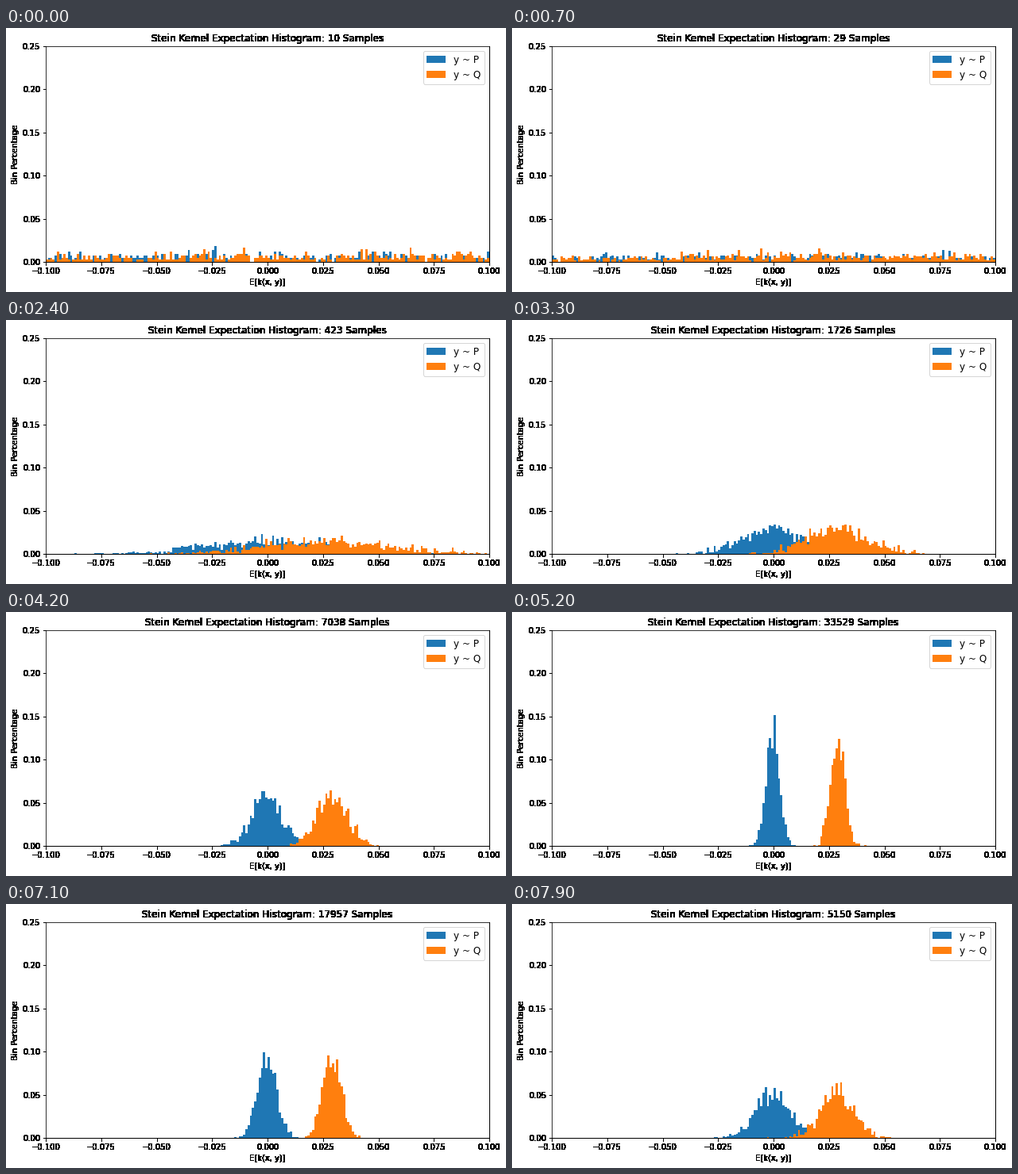
These frames come from a looping animation (629x333 px, 8 s). A matplotlib script:

```python
import matplotlib.pyplot as plt
import numpy as np
from matplotlib.animation import FuncAnimation

W, H, DPI = 629, 333, 72
FRAMES, INTERVAL = 80, 100
STEPS, TRIALS = 60, 1000
SPREAD = 0.568  # standard deviation of the estimate at one sample
MEANS = {"y ~ P": -0.0004, "y ~ Q": 0.029}

np.random.seed(7)
noise = np.random.standard_normal((STEPS, len(MEANS), TRIALS))
edges = np.linspace(-0.1, 0.1, 201)
sample_counts = np.logspace(1, 5, STEPS).astype(int)


def bin_shares(step):
    """Histogram shares of the in-range estimates for P and Q."""
    sigma = SPREAD / np.sqrt(sample_counts[step])
    for mean, deviations in zip(MEANS.values(), noise[step]):
        counts, _ = np.histogram(mean + sigma * deviations, edges)
        yield counts / counts.sum()


def harden(image, dpi):
    """Turn every touched pixel solid, giving heavy, unsmoothed lettering."""
    image[..., 3] = image[..., 3] > 0
    return image, 0, 0


plt.rcParams["font.family"] = "DejaVu Sans"
# The tiny surplus keeps the pixel size from being truncated.
fig = plt.figure(figsize=((W + 0.01) / DPI, (H + 0.01) / DPI), dpi=DPI,
                 facecolor="white")
ax = fig.add_axes([50 / W, 38 / H, 558 / W, 272 / H])
ax.set_xlim(-0.1, 0.1)
ax.set_xticks(np.linspace(-0.1, 0.1, 9))
ax.set_yticks(np.linspace(0, 0.25, 6))
ax.set_xlabel("E[k(x, y)]", fontsize=10)
ax.set_ylabel("Bin Percentage", fontsize=10)
title = ax.set_title("", fontsize=12)

bars = [ax.stairs(np.zeros(200), edges, fill=True, color=color, label=label)
        for label, color in zip(MEANS, ("#1f77b4", "#ff7f0e"))]
ax.set_ylim(0, 0.25)
ax.legend(loc="upper right", fontsize=12)

hard_parts = [title, ax.xaxis.label, ax.yaxis.label,
              ax.spines["right"], ax.spines["bottom"]]
for axis in (ax.xaxis, ax.yaxis):
    hard_parts += [*axis.get_ticklabels(), *axis.get_ticklines()]
for part in hard_parts:
    part.set_agg_filter(harden)


def update(frame):
    step = min(frame, 2 * STEPS - 1 - frame)  # forward, then back again
    for bar, shares in zip(bars, bin_shares(step)):
        bar.set_data(values=shares)
    title.set_text("Stein Kernel Expectation Histogram: "
                   f"{sample_counts[step]} Samples")
    return [*bars, title]


anim = FuncAnimation(fig, update, frames=FRAMES, interval=INTERVAL,
                     repeat=True, repeat_delay=0, blit=False)
plt.show()
```
